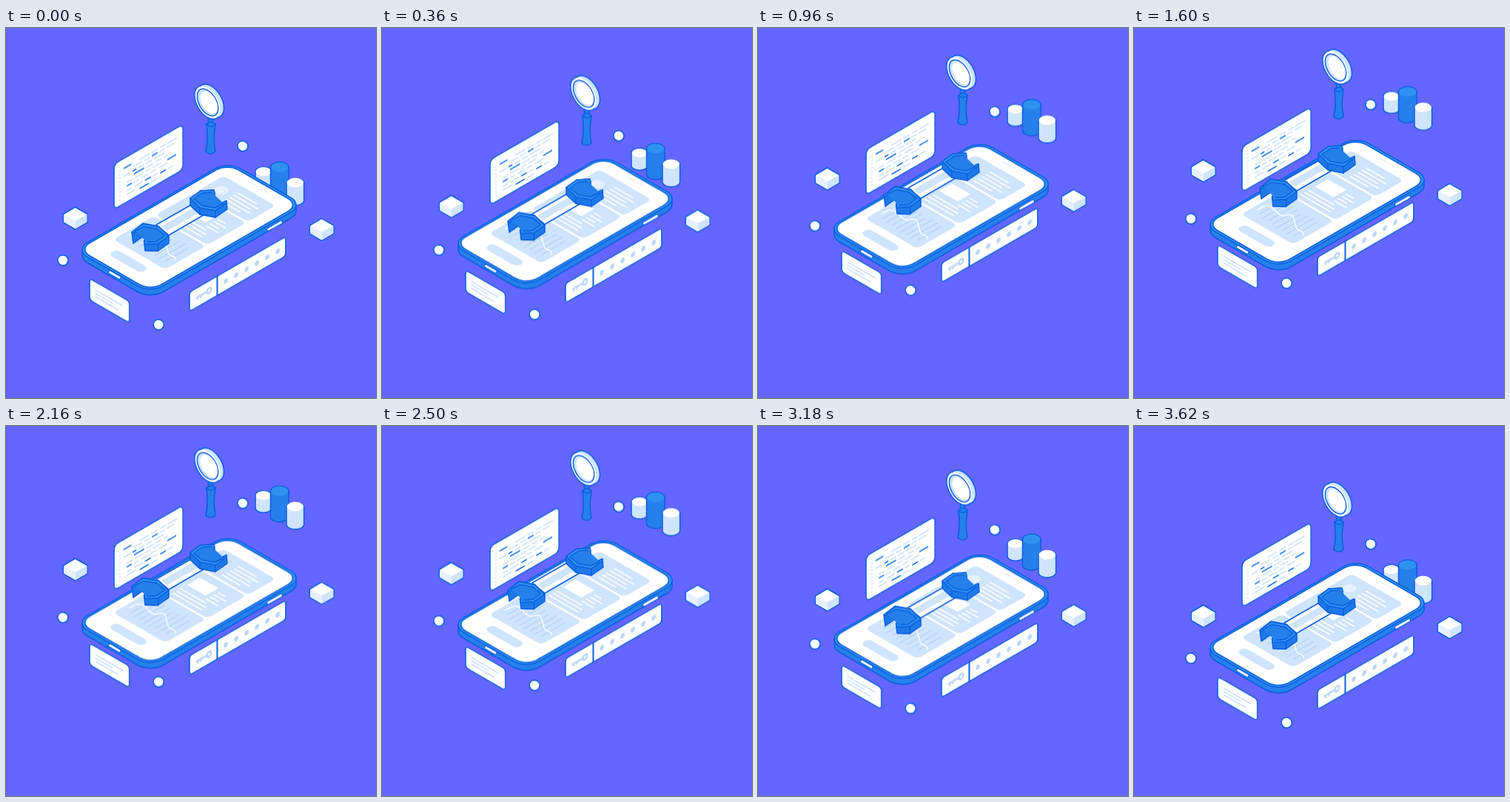
Write an HTML page without scripts that moves like this. It is 500 by 500 pixels and loops after 3.98 s.

```html
<!DOCTYPE html>
<html lang="en">
<head>
<meta charset="utf-8">
<title>Floating phone tools</title>
<style>
  html, body { margin: 0; width: 100%; height: 100%; overflow: hidden; background: #6366ff; }
  svg { display: block; width: 100vw; height: 100vh; }

  .float { animation: rise 3980ms infinite; }
  @keyframes rise {
    0% { transform: translateY(0); animation-timing-function: cubic-bezier(.3, .1, .25, 1); }
    45.477% { transform: translateY(calc(var(--rise) * -1px)); animation-timing-function: cubic-bezier(.75, 0, .7, .9); }
    90.955%, 100% { transform: translateY(0); }
  }

  .edge { stroke: #0b5fe0; stroke-width: 1.5; stroke-linejoin: round; stroke-linecap: round; }
  .edge, .edge * { vector-effect: non-scaling-stroke; }
  .white { fill: #fff; }
  .pale { fill: #cfe4fd; }
  .soft { fill: #e6f1ff; }
  .blue { fill: #2680eb; }
  .light { fill: #2f92f0; }
  .deep { fill: #1f78e8; }
  .none { fill: none; }
  .line { fill: none; stroke-width: 2; }
  .thin { fill: none; stroke-width: 1; }
  .on-white { stroke: #cfe4fd; }
  .on-pale { stroke: #fff; }
  .accent { stroke: #2680eb; }
</style>
</head>
<body>
<svg viewBox="0 0 500 500">
  <defs>
    <g id="cube" class="edge">
      <path class="white" d="M0 -15 16.5 -5.5V5.5L0 15 -16 5.5V-5.5Z"/>
      <path class="pale" stroke="none" d="M.5 3.5 15.8 -5V5.2L.5 14.2Z"/>
      <path class="soft" stroke="none" d="M-15.3 -5 .5 3.5V14.2L-15.3 5.2Z"/>
    </g>
    <g id="dot" class="edge">
      <circle class="soft" r="7"/>
      <circle class="white" stroke="none" cx="-.8" cy="-.8" r="5.4"/>
    </g>
    <path id="jaw" d="M249 230 263 220 281 219 282 223.500 268 230 274 239 286 239 298 233.500V236L283 247 262 243Z"/>
    <path id="bevel" d="M278 222 265 223 254 231 265 240 282 243 294 237"/>
  </defs>

  <!-- cylinders -->
  <g class="float edge" style="--rise:102.5">
    <path class="pale" d="M337 194V211A11 6.300 0 0 0 359 211V194A11 6.300 0 0 0 337 194Z"/>
    <ellipse class="white" stroke="none" cx="348" cy="194" rx="10.400" ry="6"/>
    <path class="blue" d="M357.500 188V223A12.200 7 0 0 0 382 223V188A12.200 7 0 0 0 357.500 188Z"/>
    <ellipse class="light" stroke="none" cx="369.700" cy="188" rx="11.500" ry="6.500"/>
    <path class="pale" d="M379 209V234A12 7 0 0 0 402.600 234V209A12 7 0 0 0 379 209Z"/>
    <ellipse class="white" stroke="none" cx="390.800" cy="209" rx="11.200" ry="6.500"/>
  </g>

  <!-- code panel -->
  <g class="float" style="--rise:23.500">
    <g transform="matrix(.866 -.5 0 1 146 184)">
      <rect class="white edge" width="107.400" height="61" rx="6"/>
      <path class="line on-white" stroke-dasharray="1.800 3" d="M9 13V54"/>
      <path class="line on-white" d="M39 13.500h16M58 13.500h10M72 13.500h9M83 13.500h15M30 18.500h14M47 18.500h9M71 18.500h8M82 18.500h12M15 24h11M38 24h9M50 24h9M62 24h16M50 29.500h12M65 29.500h9M77 29.500h7M20 34.500h9M32 34.500h14M49 34.500h8M60 34.500h12M31 40h8M42 40h12M57 40h9M70 40h13M20 46h8M31 46h14M60 46h8M20 51h14M58 53h10M84 48h8"/>
      <path class="line accent" d="M15 13.500h12M59 18.500h9M29 24h6M31 28.800h16M83 35.500h14M20 39.500h8M48.500 46h9M72 48h9M40 53h14"/>
    </g>
  </g>

  <!-- magnifier -->
  <g class="float edge" style="--rise:47.500">
    <path class="blue" d="M273.500 120V131H279.500V120Z"/>
    <path class="blue" d="M270.800 130Q277 124 283.200 130 279.500 149 283 167 277 173 270 167 274 149 270.800 130Z"/>
    <path class="none" d="M271 130Q277 136 283 130"/>
    <g transform="matrix(.866 .5 0 1 272.500 100.500)">
      <g style="stroke-width:3">
        <circle r="19.500"/>
        <circle r="19.500" cx="5" cy="-4.500"/>
      </g>
      <circle class="pale" stroke="none" r="19.500" cx="5" cy="-4.500"/>
      <circle class="white" stroke="none" r="19.500"/>
      <circle class="pale" r="16.300"/>
      <circle class="white" stroke="none" cx="2" cy="-1" r="13.600"/>
    </g>
  </g>

  <g class="float" style="--rise:64.500"><use href="#cube" x="93.500" y="257"/></g>
  <g class="float" style="--rise:47.500"><use href="#cube" x="426.500" y="272.300"/></g>
  <g class="float" style="--rise:56.500">
    <use href="#dot" x="320" y="159.700"/>
    <use href="#dot" x="77" y="314"/>
    <use href="#dot" x="206.300" y="401"/>
  </g>

  <!-- phone -->
  <g class="float" style="--rise:34.300">
    <rect class="blue edge" width="239" height="118" rx="20" transform="matrix(.866 -.5 .866 .5 93 307.500)"/>
    <path class="blue" d="M103 299.700V307.500L392 246.800V239Z"/>
    <path class="edge" d="M103.100 299.700v7.800M391.900 239v7.800"/>
    <g transform="matrix(.866 -.5 .866 .5 93 299.700)">
      <rect class="light edge" width="239" height="118" rx="20"/>
      <g transform="translate(1 -1)">
        <rect class="soft edge" x="2.500" y="3.500" width="232" height="112" rx="17"/>
        <rect class="white" x="4.500" y="5.500" width="228" height="108" rx="15"/>
      </g>
      <g class="pale">
        <rect x="20" y="32" width="13" height="51" rx="6.500"/>
        <rect x="44" y="16" width="63" height="81" rx="6"/>
        <rect x="110" y="16" width="60" height="81" rx="6"/>
        <rect x="173" y="16" width="43" height="81" rx="6"/>
      </g>
      <path class="thin" stroke="#a9cdf6" d="M58 30h34M54 38h36M56 46h38M54 54h40M52 62h38M54 70h40M52 78h43M56 86h36"/>
      <rect class="white" x="139" y="36" width="20" height="29"/>
      <path class="line on-pale" d="M117 36V82M123 36V82M129 36V76M135 70V89M141 70V84M147 70V89M153 70V82"/>
      <circle class="soft" cx="195" cy="34" r="8"/>
      <path class="line on-pale" d="M180 50V78M186 50V88M192 50V82M198 50V88M204 50V80"/>
      <path class="thin on-white" stroke-dasharray="11 3 3 3" d="M228 48V72"/>
    </g>
    <path class="thin on-pale" style="stroke-width:1.400" d="M166 280C172 277 177 272 184 275S194 288 202 288 213 282 216 292 218 306 224 308 229 311 229 314"/>
    <path class="edge" style="stroke-width:5" d="M140.500 330 153 337.200M354.500 272.300 371.500 262.600"/>
    <path class="edge" style="stroke:#fff;stroke-width:3" d="M140.500 330 153 337.200M354.500 272.300 371.500 262.600"/>
  </g>

  <!-- wrench -->
  <g class="float edge" style="--rise:60.500">
    <path class="white" d="M203 266 250 239 270 251 220 280Z"/>
    <path class="pale" stroke="none" d="M210 268 254 242.500 263 248 218 274Z"/>
    <path class="deep" d="M249 230 263 220 281 219 282.500 228.500 274 233 278 238 287 238.500 298 233.500 299 245 283 256 262 252 249 240Z"/>
    <use class="light" href="#jaw"/>
    <use class="blue" href="#bevel"/>
    <path class="none" d="M262 243v9M283 247v9"/>
    <path class="deep" d="M170 276 185 264 206 268 220 281V291L205 301.500 188 301 186.500 287.500 190 285.500 184 282.500 172 291Z"/>
    <g transform="rotate(180 234.300 255.700)">
      <use class="light" href="#jaw"/>
      <use class="blue" href="#bevel"/>
    </g>
    <path class="none" d="M205.500 291.500v10"/>
  </g>

  <!-- password field -->
  <g class="float" style="--rise:47.500">
    <g transform="matrix(.866 -.5 0 1 248 357)">
      <rect class="white edge" width="150" height="26" rx="4"/>
      <path class="edge" style="stroke-width:2" d="M43.300 0V26"/>
      <g fill="none" stroke="#bcd8f8">
        <circle cx="30.500" cy="13" r="3.300" stroke-width="3"/>
        <path stroke-width="3" d="M27 13H10"/>
        <path stroke-width="2.500" d="M13 13v4M18 13v4"/>
        <path stroke-width="6.800" stroke-linecap="round" stroke-dasharray="0 16.200" d="M56.600 13.300H138"/>
      </g>
    </g>
  </g>

  <!-- note card -->
  <g class="float" style="--rise:46">
    <g transform="matrix(.866 .5 0 1 113 338.500)">
      <rect class="white edge" width="62" height="29" rx="4.500"/>
      <path class="line on-white" d="M9 11h43M9 15.500h27M9 20h36"/>
    </g>
  </g>
</svg>
</body>
</html>
```
